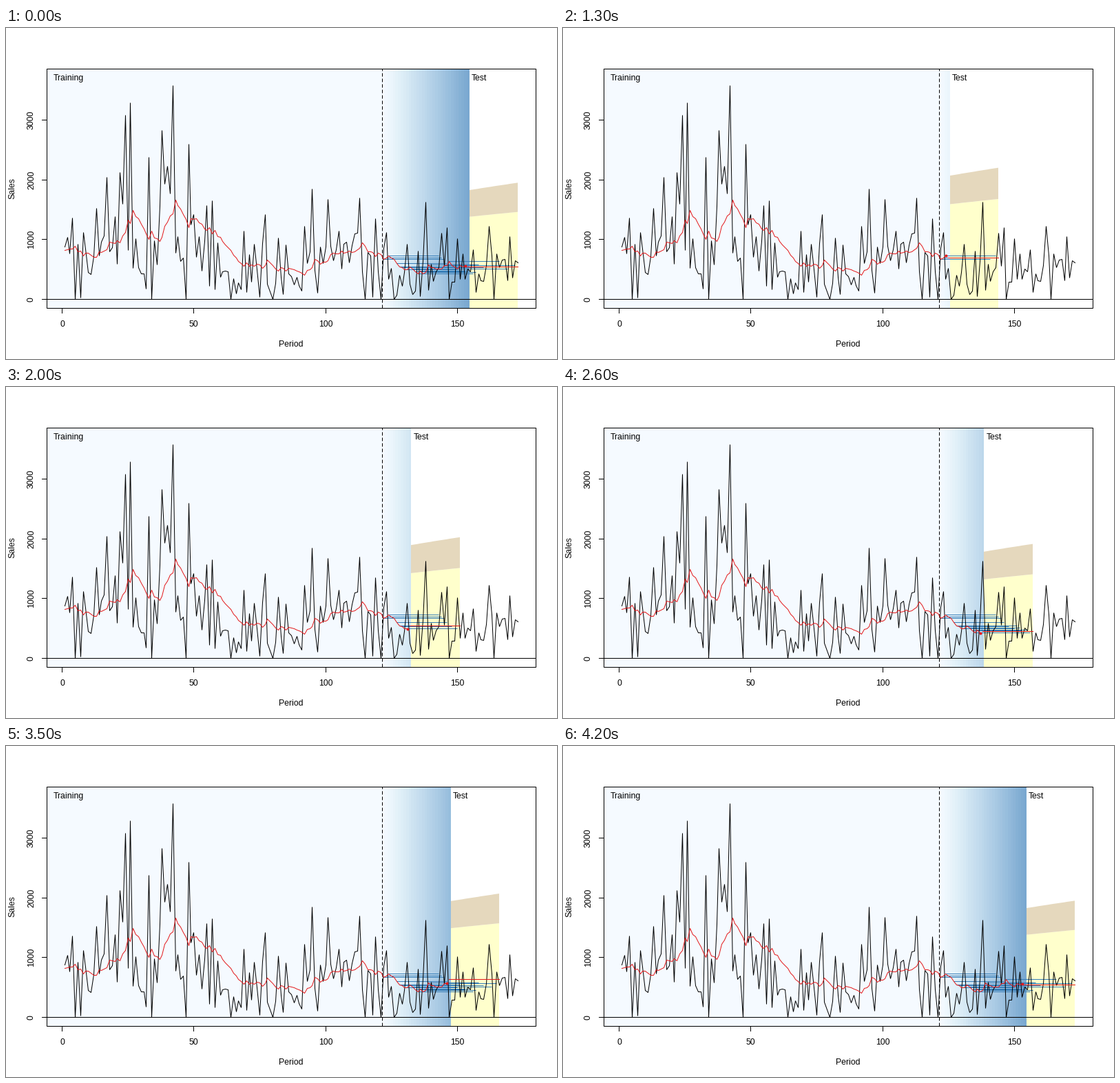
Animation of 800x480 px, one loop 4.3 s. Source, as a matplotlib script:

```python
import numpy as np
import matplotlib.pyplot as plt
from matplotlib.animation import FuncAnimation
from matplotlib.collections import LineCollection
from matplotlib.colors import LinearSegmentedColormap
from matplotlib.patches import Polygon, Rectangle

W, H, DPI = 800, 480, 100
PT = 72 / DPI                                  # one pixel in points
LEFT, RIGHT, TOP, BOTTOM = 59.5, 769.5, 59.5, 406.5
RED, BLUE = "#E41A1C", "#377EB8"
PERIODS, START, STEPS, HORIZON, HOLD = 173, 121, 33, 20, 10
ALPHA = 0.105

plt.rcParams["font.family"] = "Liberation Sans"
plt.rcParams["path.snap"] = False              # pixel centres are set by hand

# Course of the smoothed level, and the tallest single sales
course = np.array([
    (1, 820), (12, 720), (22, 960), (27, 1400), (33, 980), (37, 990),
    (43, 1590), (48, 1180), (50, 1330), (58, 1050), (68, 590), (92, 455),
    (102, 750), (114, 820), (122, 660), (124, 700), (128, 560), (132, 500),
    (138, 390), (139, 520), (142, 460), (147, 612), (150, 495), (152, 565),
    (154, 500), (173, 560)])
spikes = {4: 1360, 13: 1520, 17: 2040, 22: 2120, 24: 3080, 26: 3290,
          33: 2380, 38: 2820, 40: 2230, 42: 3570, 48: 2600, 55: 1570,
          57: 1650, 77: 1420, 95: 1850, 113: 1690, 119: 1350, 123: 1120,
          138: 1630, 162: 1220}


def simulate():
    """Noisy sales that steer their exponential smoothing along the course."""
    rng = np.random.default_rng(7)
    sales, levels = [], [float(course[0, 1])]
    for n in range(1, PERIODS + 1):
        level = levels[-1]
        pull = 6 * (np.interp(n + 1, *course.T) - level)
        swing = rng.uniform(-450, 450)
        y = spikes.get(n, max(0, level + pull + swing))
        sales.append(y)
        levels.append(level + ALPHA * (y - level))
    return np.array(sales), np.array(levels)


sales, levels = simulate()
sigma = np.linspace(705, 654, STEPS)
periods = np.arange(1, PERIODS + 1)


def px(period):
    return 81.5 + 3.826 * np.asarray(period, float)


def py(value):
    return 393.69 - 0.0868 * np.asarray(value, float)


def centre(v):
    return np.floor(v) + 0.5


fig = plt.figure(figsize=(W / DPI, H / DPI), dpi=DPI, facecolor="white")
ax = fig.add_axes([0, 0, 1, 1])
ax.set(xlim=(0, W), ylim=(H, 0))
ax.axis("off")


def line(x, y, color="black", z=5, **kw):
    return ax.plot(x, y, color=color, lw=PT, zorder=z,
                   solid_capstyle="projecting", **kw)[0]


def block(x0, x1, color, z):
    return ax.add_patch(Rectangle((x0, TOP), x1 - x0, BOTTOM - TOP, lw=0,
                                  fc=color, zorder=z))


def label(x, y, s, **kw):
    return ax.text(x, y, s, fontsize=12.3 * PT, zorder=9, **kw)


def area(color):
    return ax.add_patch(Polygon([(0, 0), (1, 0), (1, 1)], fc=color, lw=0,
                                zorder=2))


# Backgrounds
split = px(START + 0.5)
block(LEFT, split, "#F5FAFF", 1)
shades = LinearSegmentedColormap.from_list("shades", [
    (0, "#F5FAFF"), (0.19, "#E1F0F8"), (0.5, "#BCD7EB"),
    (0.78, "#98BEDD"), (1, "#7AA8D0")])
strips = [block(np.round(px(START + i + 0.5)), np.round(px(START + i + 1.5)),
                shades(i / (STEPS - 1)), 3) for i in range(STEPS)]

# Moving parts
inner, outer = area("#FFFFCC"), area("#E5D8BD")
past = ax.add_collection(LineCollection([], colors=BLUE, linewidths=PT,
                                        zorder=4))
fitted = line([], [], RED, 6)
ahead = line([], [], RED, 6)
dot, = ax.plot([], [], "o", color=RED, ms=4 * PT, mew=0, zorder=6)
test_label = label(0, 76, "Test")

# Fixed lines, axes and labels
line(centre(px(periods)), centre(py(sales)), solid_joinstyle="bevel")
line([LEFT, RIGHT], [393.5, 393.5])
line([centre(split)] * 2, [BOTTOM, TOP], dashes=(5, 3))
line([LEFT, RIGHT, RIGHT, LEFT, LEFT], [TOP, TOP, BOTTOM, BOTTOM, TOP], z=8)
for p in range(0, 151, 50):
    x = centre(px(p))
    line([x, x], [BOTTOM, BOTTOM + 7], z=8)
    label(x, 433, str(p), ha="center")
for v in range(0, 3001, 1000):
    y = centre(py(v))
    line([LEFT - 7, LEFT], [y, y], z=8)
    label(43, y, str(v), rotation=90, ha="right", va="center")
label(69, 76, "Training")
label(414, 462, "Period", ha="center")
label(9, 233, "Sales", rotation=90, ha="center", va="center")


def forecast(k):
    """Flat line over the horizon at the level known at step k."""
    origin = START + k
    y = centre(py(levels[origin]))
    return [(centre(px(origin + 1)), y), (centre(px(origin + HORIZON)), y)]


def update(frame):
    k = STEPS - 1 if frame < HOLD else frame - HOLD
    origin = START + k

    for i, strip in enumerate(strips):
        strip.set_visible(i <= k)

    h = np.arange(1, HORIZON + 1)
    x = np.floor(px(origin + h))
    spread = sigma[k] * np.sqrt(1 + (h - 1) * ALPHA ** 2)
    mid = py(levels[origin] + 1.2816 * spread)
    high = py(levels[origin] + 1.96 * spread)
    inner.set_xy([*zip(x, mid), (x[-1], BOTTOM), (x[0], BOTTOM)])
    outer.set_xy([*zip(x, high), *zip(x[::-1], mid[::-1])])

    past.set_segments([forecast(j) for j in range(k)])
    ahead.set_data(*zip(*forecast(k)))
    fitted.set_data(centre(px(periods[:origin])), centre(py(levels[:origin])))
    dot.set_data([px(origin)], [py(levels[origin - 1])])
    test_label.set_x(px(origin + 1.5) + 3)
    return []


anim = FuncAnimation(fig, update, frames=HOLD + STEPS, interval=100,
                     repeat=True, repeat_delay=0, blit=False)
plt.show()
```
